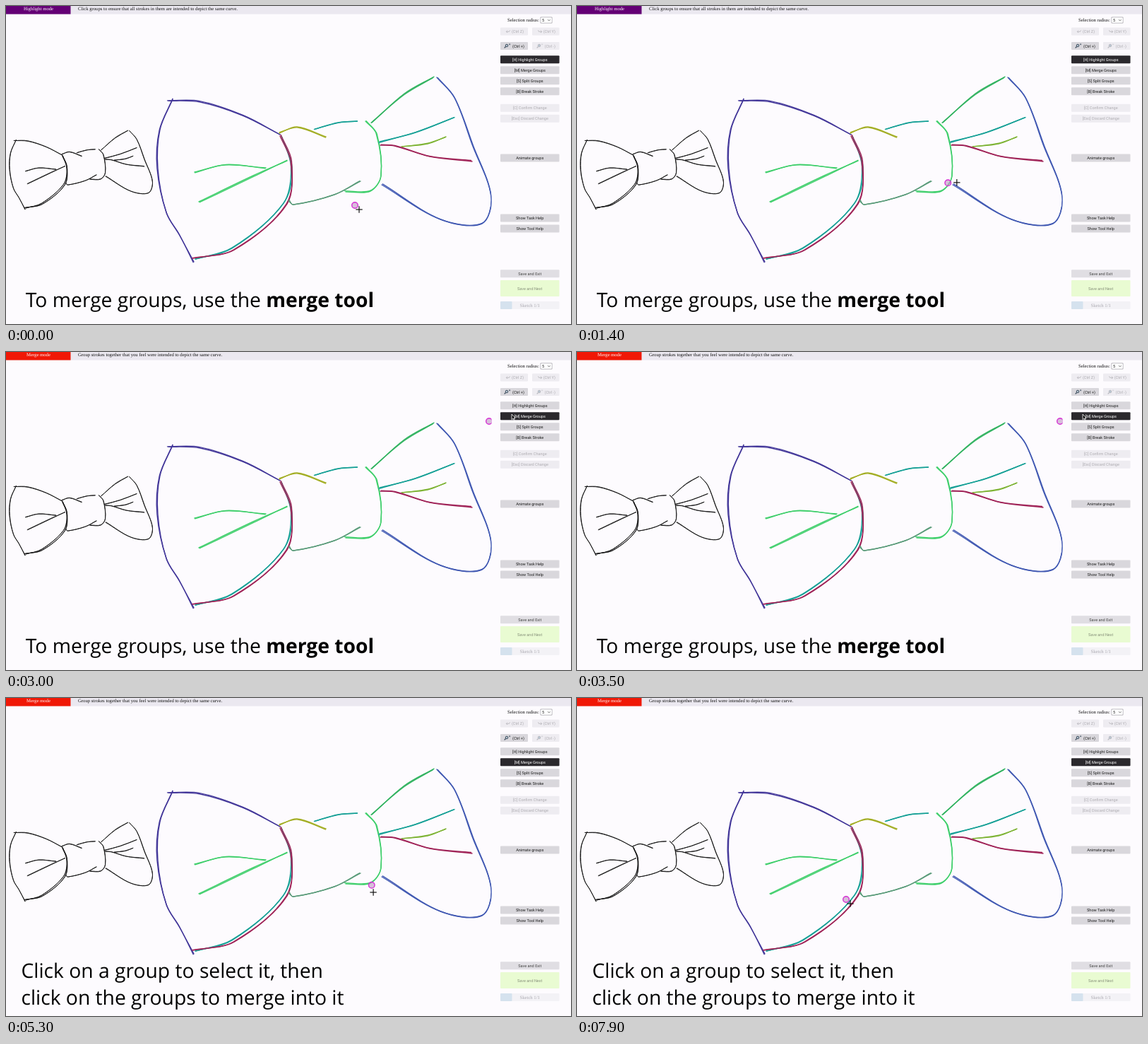
Recreate the animation shown at these times as an HTML page with a canvas. Size 800 by 450 pixels, loop 8 s.

```html
<!DOCTYPE html>
<html lang="en">
<head>
<meta charset="utf-8">
<title>Merge tool</title>
<style>
html, body { margin: 0; width: 100%; height: 100%; overflow: hidden; background: #fdfbfe; }
canvas { display: block; width: 800px; height: 450px; }
</style>
</head>
<body>
<canvas id="stage" width="800" height="450"></canvas>
<script>
const canvas = document.getElementById('stage');
const ctx = canvas.getContext('2d');
ctx.textRendering = 'geometricPrecision';

const LOOP = 8000, STEP = 100;
const MERGE_AT = 2800, CAPTION_AT = 5100, RING_LAG = 30;
const SERIF = '6.7px "Liberation Serif", serif';
const SANS = '5.55px Roboto, sans-serif';
const BIG = '28.25px "Open Sans", sans-serif';

let seed = 11;
const random = () => (seed = seed * 16807 % 2147483647) / 2147483647;
const jitter = () => (random() - 0.5) * 3;

// Every line is drawn twice: once through its key points, once a little off them.
const strokes = [];
function sketch(color, ...points) {
  const echo = points.map(([x, y]) => [x + jitter(), y + jitter()]);
  strokes.push({ color, points }, { color, points: echo });
}

const violet = '#44389a', teal = '#16a096', crimson = '#a02458', green = '#3fcf6b';
const olive = '#a3ae24', leaf = '#2fb25e', blue = '#4058b2', moss = '#589a78';

function sketchLeftWing() {
  sketch(violet, [230, 134], [275, 136], [335, 155], [388, 182]);
  sketch(violet, [236, 132], [218, 175], [215, 230], [227, 292], [246, 325], [266, 362]);
  sketch(teal, [268, 358], [320, 343], [393, 279], [405, 228], [390, 184]);
  sketch(crimson, [265, 357], [322, 345], [398, 280], [403, 220], [388, 184]);
  sketch(green, [267, 235], [310, 225], [368, 229]);
  sketch(green, [273, 277], [350, 240], [398, 219]);
}

function sketchKnot() {
  sketch(olive, [387, 180], [412, 171], [453, 185]);
  sketch(teal, [438, 174], [470, 165], [497, 163]);
  sketch(green, [509, 163], [524, 180], [531, 240], [516, 262], [481, 263]);
  sketch(moss, [400, 276], [407, 281], [465, 267], [502, 248]);
}

function sketchRightWing() {
  sketch(leaf, [518, 165], [564, 124], [606, 100]);
  sketch(blue, [610, 101], [635, 130], [660, 196], [687, 270], [674, 308], [615, 302], [532, 253]);
  sketch(teal, [529, 192], [580, 179], [634, 158]);
  sketch('#7fb436', [560, 199], [597, 195], [623, 185]);
  sketch(crimson, [530, 197], [550, 198], [600, 213], [660, 220]);
}

sketchLeftWing();
sketchKnot();
sketchRightWing();

const START = [500, 288];
const moves = [
  { begin: 1100, end: 2200, to: [718, 91], bulge: 5 },
  { begin: 4200, end: 5500, to: [508, 289], bulge: -8 },
  { begin: 6600, end: 7700, to: [387, 291], bulge: 0 }
];
const clamp = (v, low, high) => Math.max(low, Math.min(high, v));
const ease = u => u * u * (3 - 2 * u);

function pointerAt(t) {
  let [x, y] = START;
  for (const { begin, end, to, bulge } of moves) {
    const k = ease(clamp((t - begin) / (end - begin), 0, 1));
    const dx = to[0] - x, dy = to[1] - y;
    const side = bulge * 4 * k * (1 - k) / Math.hypot(dx, dy);
    x += dx * k + dy * side;
    y += dy * k - dx * side;
  }
  return [x, y];
}

// The brush ring trails the pointer and stops at the edge of the drawing area.
function ringAt(t) {
  const [x, y] = pointerAt(t - RING_LAG);
  return [Math.min(x - 6, 684), Math.max(y - 6, 98)];
}

function smooth(points) {
  const at = i => points[clamp(i, 0, points.length - 1)];
  ctx.beginPath();
  ctx.moveTo(...points[0]);
  for (let i = 0; i < points.length - 1; i++) {
    const [a, b, c, d] = [at(i - 1), at(i), at(i + 1), at(i + 2)];
    // Tangents are scaled by segment length so uneven spacing does not overshoot.
    const len = (p, q) => Math.hypot(q[0] - p[0], q[1] - p[1]);
    const mid = len(b, c), k1 = mid / (len(a, b) + mid) / 3, k2 = mid / (mid + len(c, d)) / 3;
    ctx.bezierCurveTo(b[0] + (c[0] - a[0]) * k1, b[1] + (c[1] - a[1]) * k1,
      c[0] - (d[0] - b[0]) * k2, c[1] - (d[1] - b[1]) * k2, c[0], c[1]);
  }
  ctx.stroke();
}

function bow(width, color) {
  ctx.lineWidth = width;
  ctx.lineCap = ctx.lineJoin = 'round';
  for (const s of strokes) {
    ctx.strokeStyle = color || s.color;
    smooth(s.points);
  }
}

function box(x, y, w, h, color) {
  ctx.fillStyle = color;
  ctx.beginPath();
  ctx.roundRect(x, y, w, h, 1);
  ctx.fill();
}

function text(str, x, y, font, color, align = 'left') {
  ctx.font = font;
  ctx.fillStyle = color;
  ctx.textAlign = align;
  ctx.fillText(str, x, y);
}

function line(color, width, ...points) {
  ctx.strokeStyle = color;
  ctx.lineWidth = width;
  ctx.beginPath();
  points.forEach(p => ctx.lineTo(...p));
  ctx.stroke();
}

function disc(x, y, r, fill, edge, width) {
  ctx.beginPath();
  ctx.arc(x, y, r, 0, Math.PI * 2);
  ctx.fillStyle = fill;
  ctx.fill();
  ctx.strokeStyle = edge;
  ctx.lineWidth = width;
  ctx.stroke();
}

const looks = {
  normal: ['#d9d7dc', '#1c1c1c'],
  active: ['#2b292d', '#fff'],
  faded: ['#e0dee3', '#444'],
  off: ['#eeecf1', '#aeacb2']
};

function button(label, y, look = 'normal', x = 700, w = 83.5, shift = 0) {
  const [fill, ink] = looks[look];
  box(x, y - 5.5, w, 11, fill);
  text(label, x + w / 2 + shift, y + 2, SANS, ink, 'center');
}

function column(y, look, labels) {
  labels.forEach((label, i) => button(label, y + 15 * i, look));
}

function lens(x, y, color, plus) {
  disc(x, y, 1.8, '#b9c8d4', color, 0.9);
  line(color, 1.2, [x - 1.5, y + 1.5], [x - 3.3, y + 3.3]);
  line(color, 0.6, [x + 3, y - 1.8], [x + 5.2, y - 1.8]);
  if (plus) line(color, 0.6, [x + 4.1, y - 2.9], [x + 4.1, y - 0.7]);
}

function turnArrow(x, y, dir) {
  line('#aeacb2', 0.7, [x - 2.5 * dir, y], [x + 1.5 * dir, y], [x + 2.5 * dir, y - 2]);
  line('#aeacb2', 0.7, [x - dir, y - 1.7], [x - 2.7 * dir, y], [x - dir, y + 1.7]);
}

function panel(merging, hover) {
  text('Selection radius:', 710, 22.3, SERIF, '#111');
  box(756.5, 15.5, 17, 9, '#aaa8ae');
  box(757.2, 16.2, 15.6, 7.6, '#fff');
  text('5', 759, 22.2, SANS, '#222');
  line('#555', 0.7, [767, 19], [768.8, 21], [770.6, 19]);

  button('(Ctrl Z)', 36, 'off', 700, 39, 5);
  button('(Ctrl Y)', 36, 'off', 745, 38.5, 5);
  turnArrow(711, 36.3, 1);
  turnArrow(756, 36.3, -1);
  button('(Ctrl +)', 56.5, 'normal', 700, 39, 6);
  button('(Ctrl -)', 56.5, 'off', 745, 38.5, 6);
  lens(709, 56, '#2d3f50', true);
  lens(755, 56, '#b6b6bd', false);

  if (hover) box(699.6, 86.2, 84.4, 11, '#a5a3a8');
  column(75.8, 'normal', ['[H] Highlight Groups', '[M] Merge Groups', '[S] Split Groups', '[B] Break Stroke']);
  if (merging) button('[M] Merge Groups', 90.8, 'active');
  else button('[H] Highlight Groups', 75.8, 'active');
  column(144.2, 'off', ['[C] Confirm Change', '[Esc] Discard Change']);
  button('Animate groups', 215);
  column(300, 'normal', ['Show Task Help', 'Show Tool Help']);
  button('Save and Exit', 378.8, 'faded');
  box(700, 388, 83.5, 23, '#e9fbd2');
  text('Save and Next', 741.7, 402, SANS, '#87917a', 'center');
  box(700, 418, 83.5, 11, '#f3f2f6');
  box(700, 418, 16.5, 11, '#d5e2ee');
  text('Sketch 1/1', 727.5, 426, SERIF, '#aaa8b0');
}

function header(merging) {
  ctx.fillStyle = '#ebe8f0';
  ctx.fillRect(0, 0, 800, 11.5);
  ctx.fillStyle = merging ? '#f01806' : '#640075';
  ctx.fillRect(0, 0, 91.5, 11.5);
  text(merging ? 'Merge mode' : 'Highlight mode', 46, 6, SERIF, '#fff', 'center');
  text(merging
    ? 'Group strokes together that you feel were intended to depict the same curve.'
    : 'Click groups to ensure that all strokes in them are intended to depict the same curve.',
    102, 6, SERIF, '#111');
}

function caption(second) {
  if (second) {
    text('Click on a group to select it, then', 21.5, 395.5, BIG, '#000');
    text('click on the groups to merge into it', 21.5, 433.5, BIG, '#000');
    return;
  }
  const lead = 'To merge groups, use the ';
  text(lead, 27.7, 425.5, BIG, '#000');
  text('merge tool', 27.7 + ctx.measureText(lead).width, 425.5, 'bold ' + BIG, '#000');
}

function shape(x, y, points, fill, edge) {
  ctx.beginPath();
  points.forEach(([dx, dy]) => ctx.lineTo(x + dx, y + dy));
  ctx.closePath();
  ctx.fillStyle = fill;
  ctx.fill();
  ctx.strokeStyle = edge;
  ctx.lineWidth = 0.8;
  ctx.stroke();
}

function cursor([x, y], merging) {
  if (x < 690) {
    line('#111', 1.2, [x - 4.7, y], [x + 4.7, y]);
    line('#111', 1.2, [x, y - 4.7], [x, y + 4.7]);
  } else if (merging || x < 700) {
    shape(x - 2, y - 3, [[0, 0], [0, 7.5], [1.8, 6], [3, 8.5], [4.2, 8], [3, 5.5], [5.2, 5.3]], '#111', '#fff');
  } else {
    shape(x - 1, y - 4, [[-0.9, 0], [0.7, 0], [0.9, 3], [4.5, 4], [3.4, 9.5], [-0.8, 9.5], [-3.4, 6], [-0.9, 6.4]], '#fff', '#333');
  }
}

function draw(t) {
  const merging = t >= MERGE_AT;
  const pointer = pointerAt(t);
  ctx.fillStyle = '#fdfbfe';
  ctx.fillRect(0, 0, 800, 450);
  header(merging);

  ctx.save();
  ctx.translate(4.5, 176);
  ctx.scale(0.428, 0.426);
  ctx.translate(-213, -100);
  bow(2.2, '#181818');
  ctx.restore();

  ctx.save();
  ctx.beginPath();
  ctx.rect(0, 11, 687.5, 439);
  ctx.clip();
  bow(1.4);
  disc(...ringAt(t), 4.3, 'rgba(190, 150, 195, .6)', '#d62fd4', 1.4);
  ctx.restore();

  panel(merging, !merging && pointer[0] > 700);
  caption(t >= CAPTION_AT);
  cursor(pointer, merging);
}

function tick(now) {
  draw(Math.floor(now % LOOP / STEP) * STEP);
  requestAnimationFrame(tick);
}
draw(0);
requestAnimationFrame(tick);
</script>
</body>
</html>
```
